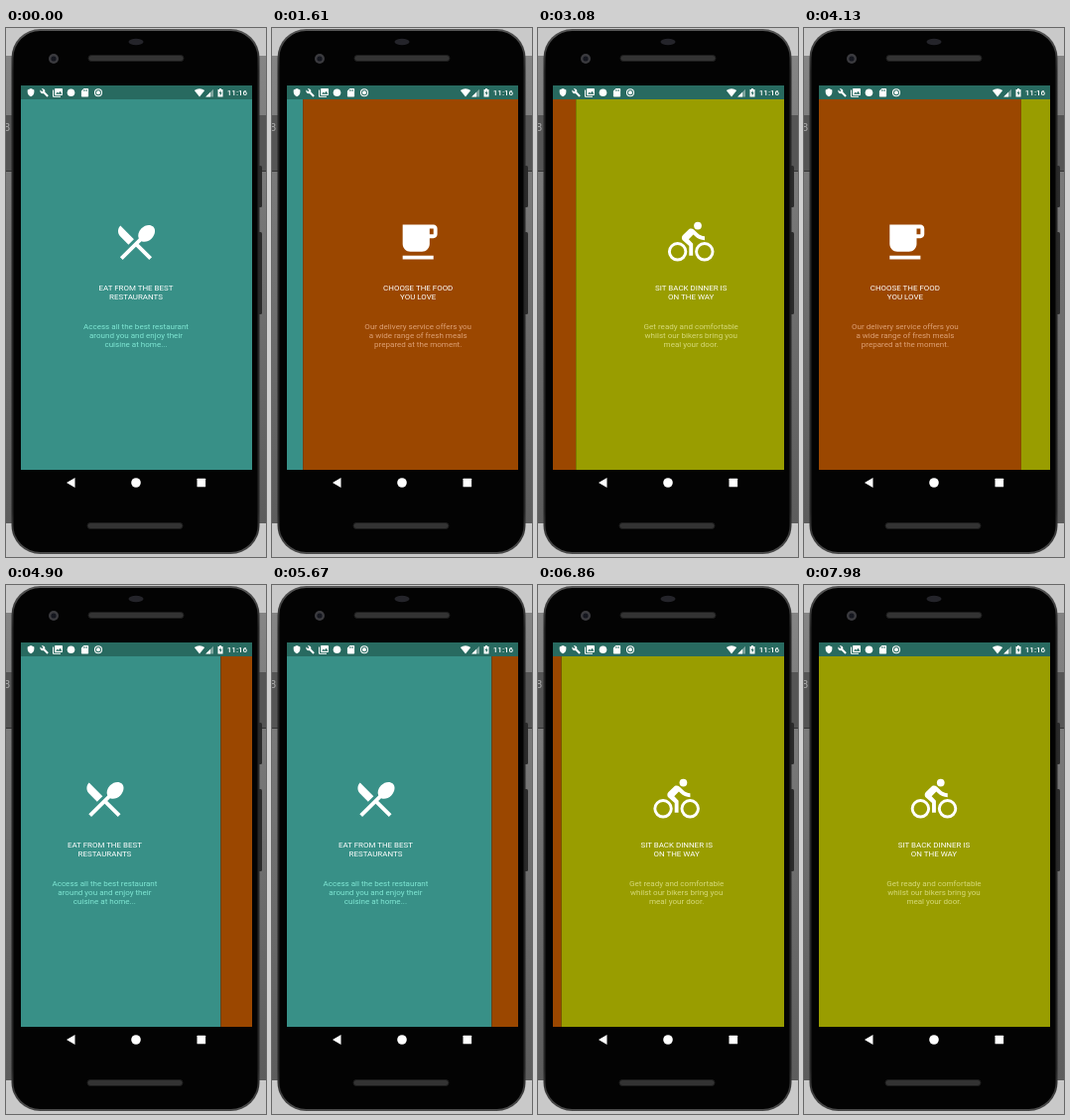
Animation of 262 by 534 pixels, one loop 8 s. Source, as an HTML page:

```html
<!DOCTYPE html>
<html lang="en">
<head>
<meta charset="utf-8">
<title>Onboarding pager</title>
<style>
  html, body { margin: 0; width: 100%; height: 100%; overflow: hidden; background: #6b6b6b; }
  svg { display: block; width: 100%; height: 100%; }
  text { font-family: Roboto, sans-serif; }
  .title { font-size: 7.94px; fill: #fff; text-anchor: middle; }
  .body { font-size: 8.05px; text-anchor: middle; }
  .clock { font-size: 8px; font-weight: 500; fill: #fff; }
</style>
</head>
<body>
<svg viewBox="0 0 262 534">
  <defs>
    <clipPath id="screen"><rect x="15" y="72" width="233" height="374"/></clipPath>
    <linearGradient id="desk" x2="0" y2="1">
      <stop offset="0" stop-color="#858585"/>
      <stop offset=".5" stop-color="#707070"/>
      <stop offset="1" stop-color="#5c5c5c"/>
    </linearGradient>
    <linearGradient id="rim" x2="0" y2="1">
      <stop offset="0" stop-color="#555"/>
      <stop offset=".08" stop-color="#262626"/>
      <stop offset=".92" stop-color="#262626"/>
      <stop offset="1" stop-color="#4a4a4a"/>
    </linearGradient>
  </defs>

  <!-- Desktop behind the phone -->
  <rect width="262" height="534" fill="#c9c9c9"/>
  <rect y="28" width="262" height="472" fill="url(#desk)"/>
  <rect y="88" width="262" height="57" fill="#555"/>
  <text x="-2" y="104" font-size="11" fill="#aaa">8</text>
  <rect y="144" width="262" height="1" fill="#333"/>

  <!-- Phone -->
  <rect x="254" y="139" width="4" height="42" rx="1.5" fill="#2b2b2b"/>
  <rect x="254" y="206" width="4" height="83" rx="1.5" fill="#2b2b2b"/>
  <rect x="5.5" y="1" width="250" height="530" rx="29" fill="url(#rim)"/>
  <rect x="7.5" y="3" width="246" height="526" rx="27" fill="#030303"/>
  <ellipse cx="131" cy="14" rx="7.5" ry="3.3" fill="#24242a"/>
  <circle cx="48" cy="31" r="5" fill="#3b3b3f"/>
  <circle cx="48" cy="31" r="2.6" fill="#14161e"/>
  <g fill="#333" stroke="#1c1c1c">
    <rect x="83" y="27.5" width="96" height="6" rx="3"/>
    <rect x="82" y="499.5" width="96" height="6" rx="3"/>
  </g>

  <g id="pages" clip-path="url(#screen)"></g>

  <!-- Status bar -->
  <rect x="15" y="58" width="233" height="14" fill="#286a60"/>
  <g fill="#fff">
    <path transform="translate(20.6 60.7) scale(.37)" d="M12 1L3 5v6c0 5.55 3.84 10.74 9 12 5.16-1.26 9-6.45 9-12V5z"/>
    <path transform="translate(34 60.8) scale(.38)" d="M22.7 19l-9.1-9.1c.9-2.3.4-5-1.5-6.9-2-2-5-2.4-7.4-1.3L9 6 6 9 1.6 4.7C.4 7.1.9 10.1 2.9 12.1c1.9 1.9 4.6 2.4 6.9 1.5l9.1 9.1c.4.4 1 .4 1.4 0l2.3-2.3c.5-.4.5-1.1.1-1.4z"/>
    <path d="M47.5 62.5v6.8h7.5" fill="none" stroke="#fff"/>
    <rect x="49" y="61" width="8" height="7" rx=".8"/>
    <path d="M50.2 66.8l1.6-2.2 1.2 1.3 1.5-2.2 2 3.1z" fill="#286a60"/>
    <circle cx="65.5" cy="65.3" r="3.8"/>
    <path d="M78.5 61h3.9q.7 0 .7.7v7q0 .8-.8.8h-5.6q-.8 0-.8-.8v-5.1z"/>
    <path d="M78.6 62v2M80 62v2M81.4 62v2" stroke="#286a60" stroke-width=".6"/>
    <circle cx="93" cy="65.3" r="3.5" fill="none" stroke="#fff" stroke-width="1.1"/>
    <circle cx="93" cy="65.3" r="2"/>
    <path d="M195 69.6l-5.2-6.5q5.2-3.7 10.4 0z"/>
    <path d="M201.2 69.5h7.8v-7.8z" opacity=".4"/>
    <path d="M201.2 69.5h4.8v-4.8z"/>
    <path d="M215 61h2v.9h1.5v7.6h-5v-7.6h1.5z"/>
    <path d="M216.5 63l-1.9 3h1.1v2.5l1.9-3.2h-1.1z" fill="#286a60"/>
  </g>
  <text class="clock" x="222.8" y="68.4">11:16</text>

  <!-- Navigation bar -->
  <g fill="#fff">
    <path d="M61 459l8.5-5v10z"/>
    <circle cx="131" cy="459" r="4.8"/>
    <rect x="192.5" y="454.8" width="8.6" height="8.4" rx=".5"/>
  </g>
</svg>

<script>
const PAGE_WIDTH = 233, LOOP = 8000, LINE = 9.35;

const wheel = x => `<circle cx="${x}" cy="17" r="4.25" fill="none" stroke="#fff" stroke-width="1.5"/>`;

const pages = [
  {
    color: '#389087', ink: '#7fe6d3',
    title: ['EAT FROM THE BEST', 'RESTAURANTS'],
    body: ['Access all the best restaurant', 'around you and enjoy their', 'cuisine at home...'],
    icon: `<path d="M8.1 13.34l2.83-2.83L3.91 3.5c-1.56 1.56-1.56 4.09 0 5.66z
      M14.88 11.53c1.53.71 3.68.21 5.27-1.38 1.91-1.91 2.28-4.65.81-6.12-1.46-1.46-4.2-1.1-6.12.81
      -1.59 1.59-2.09 3.74-1.38 5.27L3.7 19.87l1.41 1.41L12 14.41l6.88 6.88 1.41-1.41L13.41 13z"/>`
  },
  {
    color: '#9b4700', ink: '#dda073',
    title: ['CHOOSE THE FOOD', 'YOU LOVE'],
    body: ['Our delivery service offers you', 'a wide range of fresh meals', 'prepared at the moment.'],
    icon: `<path d="M20 3H4v10c0 2.21 1.79 4 4 4h6c2.21 0 4-1.79 4-4v-3h2c1.11 0 2-.9 2-2V5
      c0-1.11-.89-2-2-2zm0 5h-2V5h2zM4 19h16v2H4z"/>`
  },
  {
    color: '#999d00', ink: '#d6d978',
    title: ['SIT BACK DINNER IS', 'ON THE WAY'],
    body: ['Get ready and comfortable', 'whilst our bikers bring you', 'meal your door.'],
    icon: `<circle cx="15.5" cy="3.5" r="2"/>${wheel(5)}${wheel(19)}
      <path d="M10.8 10.5l2.4-2.4.8.8c1.3 1.3 3 2.1 5.1 2.1V9c-1.5 0-2.7-.6-3.6-1.5l-1.9-1.9
      c-.5-.4-1-.6-1.6-.6s-1.1.2-1.4.6L7.8 8.4c-.4.4-.6.9-.6 1.4 0 .6.2 1.1.6 1.4L11 14v5h2v-6.2z"/>`
  }
];

const lines = (texts, y, attrs) => texts
  .map((text, i) => `<text x="131" y="${y + i * LINE}" ${attrs}>${text}</text>`).join('');

const pager = document.getElementById('pages');
pager.innerHTML = pages.map(p => `<g>
  <rect x="15" y="72" width="${PAGE_WIDTH}" height="374" fill="${p.color}"/>
  <g transform="translate(107.7 192.8) scale(1.94)" fill="#fff">${p.icon}</g>
  ${lines(p.title, 265, 'class="title"')}
  ${lines(p.body, 303.5, `class="body" fill="${p.ink}"`)}
</g>`).join('');
const pageNodes = [...pager.children];

// Each swipe: start, duration, direction
const swipes = [
  [1090, 900, 1],
  [2620, 855, 1],
  [3740, 763, -1],
  [4600, 599, -1],
  [5530, 915, 1],
  [6445, 650, 1]
];

// Short finger drag, then a decelerating settle
function swipeEase(u) {
  if (u <= 0) return 0;
  if (u >= 1) return 1;
  return u < .25 ? .3 * (u / .25) ** 2 : 1 - .7 * ((1 - u) / .75) ** 4;
}

function frame(now) {
  const t = now % LOOP;
  const position = swipes.reduce(
    (sum, [start, duration, direction]) => sum + direction * swipeEase((t - start) / duration), 0);
  pageNodes.forEach((node, i) =>
    node.setAttribute('transform', `translate(${(i - position) * PAGE_WIDTH} 0)`));
  requestAnimationFrame(frame);
}
frame(performance.now());
</script>
</body>
</html>
```
